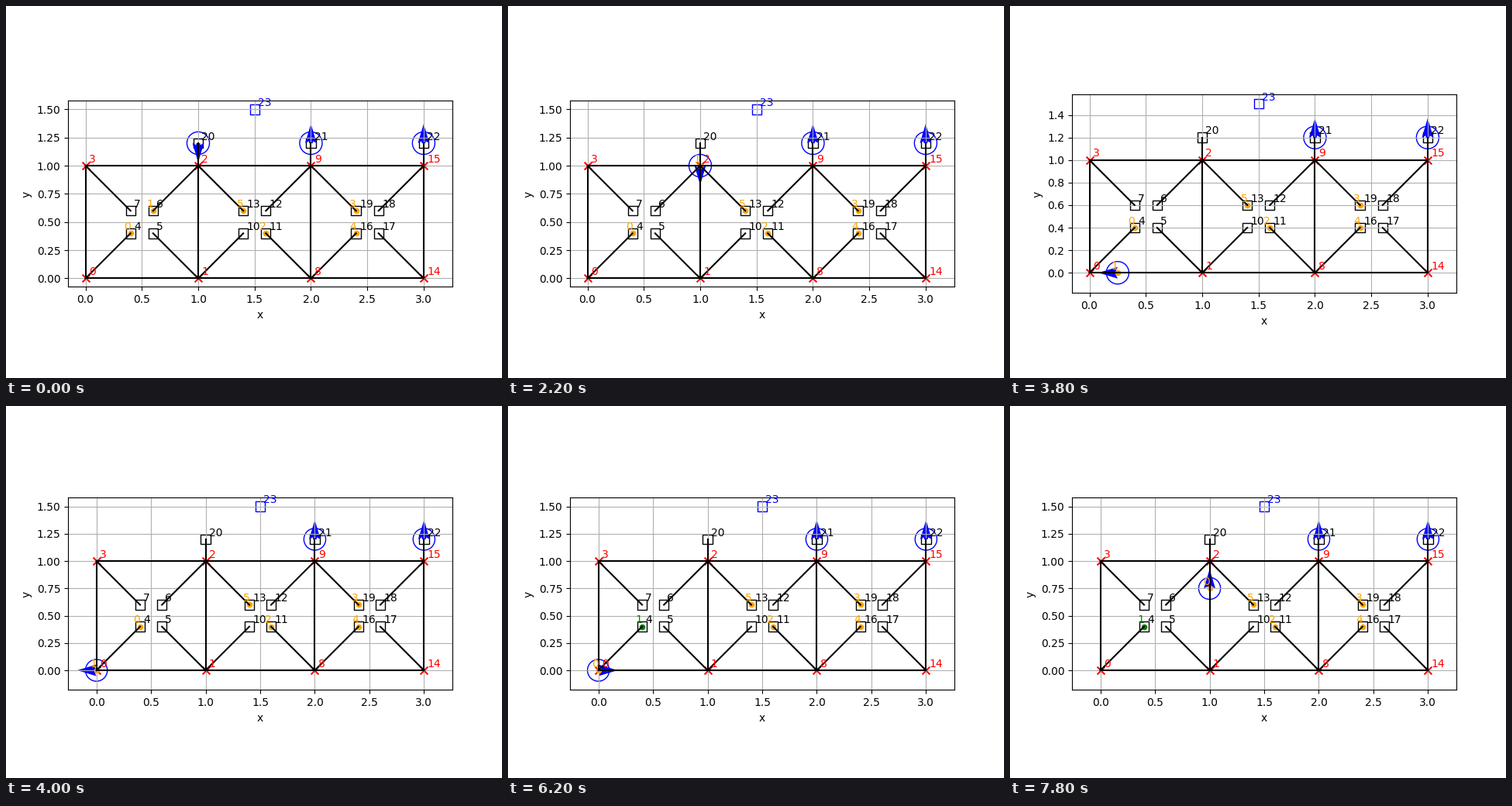
These frames come from a looping animation (640 px wide and 480 px high, 8000 ms). A matplotlib script:

```python
import math
from itertools import combinations

import matplotlib.pyplot as plt
from matplotlib.animation import FuncAnimation

SPEED = 0.25
RADIUS = 0.1
FRAMES = 40
UP = math.pi / 2


def build_nodes(bays=3):
    """Corners and inner slots bay by bay, then parking spots and a depot."""
    corners, places = {}, {}
    count = 0

    def add(group, x, y):
        nonlocal count
        group[count] = (x, y)
        count += 1

    for bay in range(bays):
        if bay == 0:
            add(corners, 0, 0)
        add(corners, bay + 1, 0)
        add(corners, bay + 1, 1)
        if bay == 0:
            add(corners, 0, 1)
        for k in range(4):
            angle = (2 * k - 3) * math.pi / 4
            add(places, bay + 0.5 + 0.1 * math.copysign(1, math.cos(angle)),
                0.5 + 0.1 * math.copysign(1, math.sin(angle)))
    for x in range(1, bays + 1):
        add(places, x, 1.2)
    add(places, bays / 2, 1.5)
    return corners, places


CORNERS, PLACES = build_nodes()
NODES = {**CORNERS, **PLACES}
DEPOT = max(NODES)
LOADS = dict(enumerate((4, 6, 11, 19, 16, 13)))
ROUTE = "go 2, go 6, pick 1, go 2, go 1, go 0, go 4, drop 1, pick 0, go 0, go 1, go 2"


def joined(a, b):
    gap = math.dist(NODES[a], NODES[b])
    if a in CORNERS and b in CORNERS:
        return gap == 1
    return (a in CORNERS or b in CORNERS) and gap < 0.6


EDGES = [pair for pair in combinations(NODES, 2) if joined(*pair)]


def simulate():
    """List of (position, heading, held load, delivered) per tick."""
    pos, heading, held, done = NODES[20], -UP, None, False
    states = [(pos, heading, held, done)]
    for step in ROUTE.split(", "):
        action, arg = step.split()
        if action == "go":
            (x, y), goal = pos, NODES[int(arg)]
            dx, dy = goal[0] - x, goal[1] - y
            length, angle = math.hypot(dx, dy), math.atan2(dy, dx)
            if abs(angle - heading) > 1e-6:
                heading = angle
                states.append((pos, heading, held, done))
            for k in range(1, math.ceil(length / SPEED - 1e-9) + 1):
                part = min(1, k * SPEED / length)
                pos = (x + dx * part, y + dy * part)
                states.append((pos, heading, held, done))
            pos = goal
        else:
            held = int(arg) if action == "pick" else None
            done = done or action == "drop"
            states.append((pos, heading, held, done))
    return states


STATES = simulate()
fig, ax = plt.subplots(figsize=(6.4, 4.8), dpi=100)


def draw_robot(pos, heading):
    ax.add_patch(plt.Circle(pos, RADIUS, color="blue", fill=False))
    ax.quiver(*pos, math.cos(heading), math.sin(heading),
              scale=20, width=0.01, color="blue")


def draw_load(name, pos, color="orange"):
    ax.scatter(*pos, s=20, color=color)
    ax.text(pos[0] - 0.06, pos[1] + 0.03, str(name), color=color)


def draw_truss():
    for a, b in EDGES:
        ax.plot(*zip(NODES[a], NODES[b]), color="black")
    for name, (x, y) in NODES.items():
        if name in CORNERS:
            color = "red"
            ax.scatter(x, y, s=50, marker="x", color=color)
        else:
            color = "blue" if name == DEPOT else "black"
            ax.scatter(x, y, s=80, marker="s", facecolors="none",
                       edgecolors=color, linewidths=1)
        ax.text(x + 0.03, y + 0.03, str(name), color=color)


def set_view(n):
    # limits grow once the robot's circle has reached past them
    xs, ys = zip(*(state[0] for state in STATES[:n + 1]))
    left, low = min(0, min(xs) - RADIUS), min(0, min(ys) - RADIUS)
    right, top = 3 + RADIUS, NODES[DEPOT][1]
    mx, my = 0.05 * (right - left), 0.05 * (top - low)
    ax.set(xlim=(left - mx, right + mx), ylim=(low - my, top + my),
           xlabel="x", ylabel="y")
    ax.set_aspect("equal", adjustable="box")
    ax.grid(True)


def draw(n):
    ax.clear()
    pos, heading, held, done = STATES[n]
    draw_truss()
    for name, node in LOADS.items():
        if name == 1 and done:
            draw_load(name, NODES[4], "green")
        elif name != held:
            draw_load(name, NODES[node])
    draw_robot(pos, heading)
    for parked in (21, 22):
        draw_robot(NODES[parked], UP)
    if held is not None:
        draw_load(held, pos)
    set_view(n)
    return []


anim = FuncAnimation(fig, draw, frames=FRAMES, init_func=lambda: draw(0),
                     interval=200, repeat=True, repeat_delay=0)
plt.show()
```
